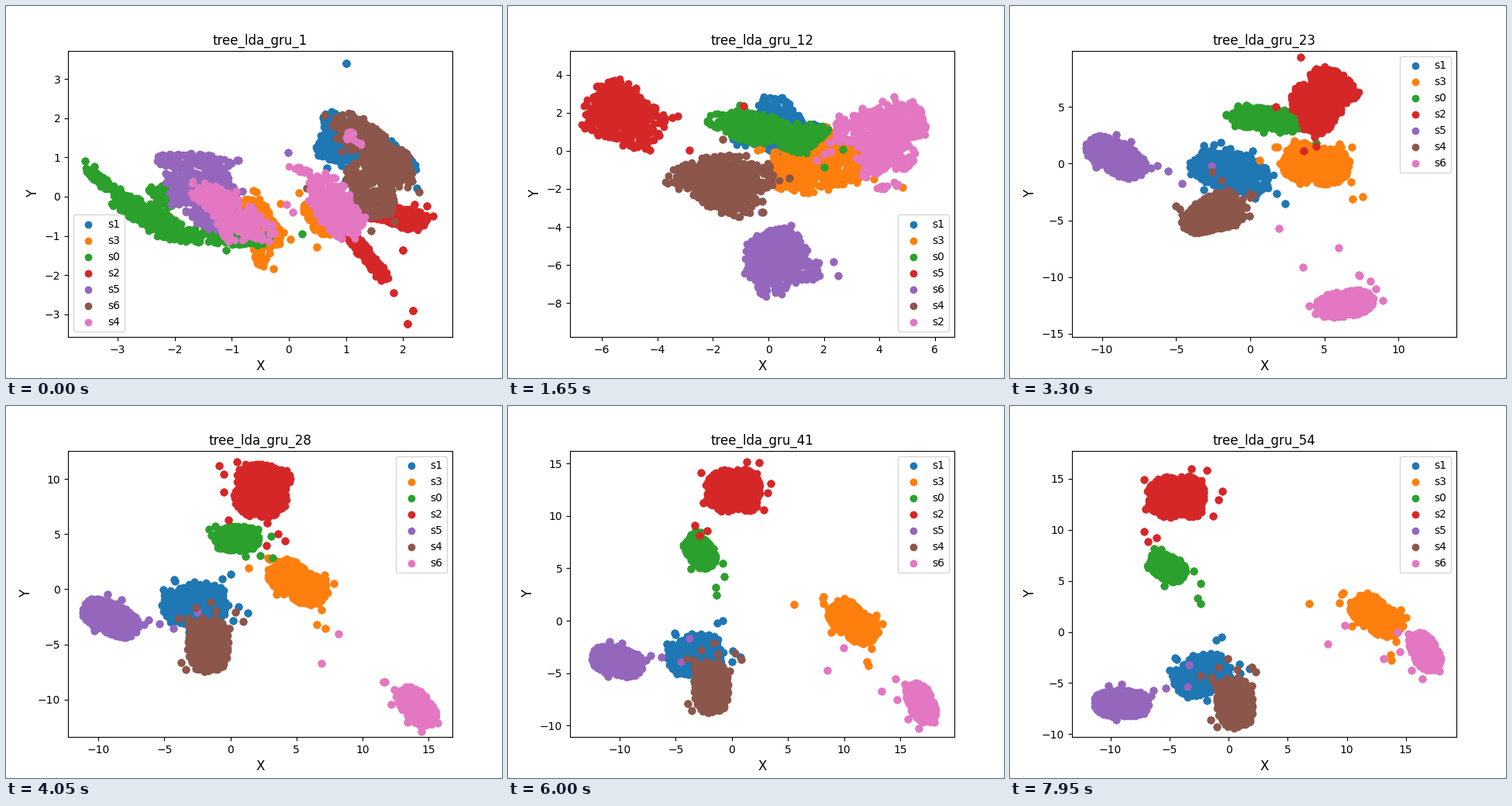
These frames come from a looping animation (640 by 480 pixels, 8000 ms). A matplotlib script:

```python
import numpy as np
import matplotlib.pyplot as plt
from matplotlib.animation import FuncAnimation

STEP_MS, TICK_MS, LOOP_MS = 150, 50, 8000
BODY, STRAY, COPIES, ROWS = 650, 12, 4, 6
MIRROR = np.array([-1, 1, 1, 1, -1])  # acts on x, y, half length, half width, tilt

# Half length and half width of each cluster once the clusters have separated.
SIZE = dict(s0=(1.6, 1.1), s1=(2.4, 1.7), s2=(2.4, 2.0), s3=(2.4, 1.4),
            s4=(2.3, 1.5), s5=(2.2, 1.3), s6=(1.9, 1.05))


def stroke(x0, y0, x1, y1, half_width):
    """A blob stretched between two points, as x, y, half length, half width, tilt."""
    tilt = np.arctan2(y1 - y0, x1 - x0)
    tilt = (tilt + np.pi / 2) % np.pi - np.pi / 2
    return (x0 + x1) / 2, (y0 + y1) / 2, np.hypot(x1 - x0, y1 - y0) / 2, half_width, tilt


def spot(x, y):
    return x, y, 0, 0, 0


def view(epoch, xlim, ylim, loc, order="1302546", mirrored=False, **blobs):
    """A key pose; `mirrored` means the x axis changes sign on the way to it."""
    return dict(epoch=epoch, xlim=np.array(xlim), ylim=np.array(ylim), loc=loc,
                order=["s" + digit for digit in order], mirrored=mirrored,
                blobs={name: np.resize(rows, (ROWS, 5)) for name, rows in blobs.items()})


def apart(epoch, xlim, ylim, mirrored=False, **places):
    """A pose with one blob of fixed size per cluster, placed by x, y and tilt."""
    blobs = {name: [(x, y, *SIZE[name], np.radians(tilt))]
             for name, (x, y, tilt) in places.items()}
    return view(epoch, xlim, ylim, "upper right", mirrored=mirrored, **blobs)


views = [
    view(1, (-3.872, 2.867), (-3.581, 3.723), "lower left", "1302564",
         s1=[stroke(.48, 1.3, 1.43, 1.2, .35), stroke(.7, 2.15, 1, 1, .2),
             stroke(1.45, 1.5, 2.2, .6, .2), spot(1, 3.4)],
         s3=[stroke(-.75, -.05, -.27, -1.25, .25), stroke(-.6, -1, -.48, -1.8, .08),
             stroke(.4, -.1, .75, -.95, .25)],
         s0=[stroke(-3.55, .7, -2.6, -.4, .1), stroke(-3.05, 0, -1.9, -.95, .25),
             stroke(-2.4, -.9, -.27, -1.1, .2), stroke(-2.4, .3, -2, -.2, .2)],
         s2=[stroke(1.2, -.2, 2.4, -.7, .25), stroke(1, -.85, 1.72, -2.15, .12),
             spot(2, -1.37), spot(2.18, -2.9), spot(2.08, -3.25)],
         s5=[stroke(-2.35, .95, -1, .85, .2), stroke(-2, .6, -1.1, -.75, .4),
             stroke(-1.35, .7, -1.05, -.8, .3)],
         s6=[stroke(.9, 2.1, 2.05, .3, .35), stroke(1.2, .9, 1.65, -.5, .35),
             stroke(1.5, 1.25, 2.1, .9, .2)],
         s4=[stroke(-1.65, .3, -.3, -1.05, .3), stroke(-1.3, .1, -.9, -1.2, .2),
             stroke(.5, .6, 1.05, -1.05, .35), stroke(.45, .1, 1.25, -.8, .3),
             stroke(0, .85, .45, .55, .08), stroke(1.05, 1.65, 1.22, 1.25, .1)]),
    view(7, (-3.339, 3.136), (-3.61, 3.498), "lower right", "1305642",
         s1=[stroke(1, 2.9, 1.15, 1.7, .25), stroke(.35, 1, 1.7, 1.9, .4),
             stroke(1.75, 1.2, 2.8, 1.15, .1)],
         s3=[stroke(-1.4, -1.4, 1.4, -1.35, .35), stroke(-1.25, -.4, 1.5, -.8, .6),
             stroke(.3, 1, .15, 0, .25)],
         s0=[stroke(-2.75, 0, -.9, -1.15, .35), stroke(-1.45, -1.2, -1, -1.6, .2),
             stroke(-1.2, -.6, 0, -.6, .15)],
         s5=[stroke(-2.8, .5, -1.05, .4, .65), stroke(-2.5, 1.8, -2.4, .8, .12),
             stroke(-2.18, 1.6, -2.12, .8, .06), stroke(-1.85, 1.9, -1.8, .9, .12),
             stroke(-2.25, -1.35, -1.45, -1.45, .25), spot(-3.04, -.82)],
         s6=[stroke(1.1, 2.8, 1.7, 2.75, .3), stroke(1.2, 1.4, 2.3, 1.5, .35),
             stroke(1.75, 1.5, 2.35, -.6, .4), stroke(1.3, -.8, 1.5, .8, .25)],
         s4=[stroke(-1.9, .3, -1, 1.6, .35), stroke(-1.1, .7, -.2, .85, .45),
             stroke(-.85, 0, -.8, -1.2, .35), stroke(-1.2, -.9, .25, -1.3, .3),
             stroke(.1, 0, 1.7, .55, .5), stroke(.75, 1.6, .8, -.55, .45)],
         s2=[stroke(-.2, -.6, 1.35, -.65, .25), stroke(1.05, -1.65, 1.25, -.5, .35),
             stroke(1.3, -.25, 2.4, .1, .45), stroke(.6, -.1, 1.5, 0, .15),
             spot(1.74, -3.28), spot(1.96, -3.17)]),
    view(18, (-10.99, 11.73), (-17.21, 7.38), "lower left", mirrored=True,
         s1=[stroke(-2, -2.6, 2, 2.4, 1.3), stroke(-.5, .2, 2, 1, 1.2)],
         s3=[stroke(-5.7, -.3, -1.7, -1, 1.9)],
         s0=[stroke(-4.7, 2.4, -.4, 4, .8), stroke(-1.5, 3.6, 1.5, 3.6, .7)],
         s2=[stroke(-9.5, 4, -5.6, 2.4, 1.7), stroke(-7.8, .5, -6.4, -1.1, .3)],
         s5=[stroke(7.6, 2.2, 10.6, 5.4, 1.2)],
         s4=[stroke(1.2, -3.9, 5.4, -3.1, 1.1), stroke(2.5, -6, 4.2, -3, .7)],
         s6=[stroke(1.2, -12.2, 1.6, -16, 1.1)]),
    apart(28, (-12.30, 16.82), (-13.41, 12.58), mirrored=True,
          s1=(-2.7, -1.4, 10), s3=(5.1, .6, -38), s0=(.5, 4.6, 0), s2=(2.4, 9, 80),
          s5=(-9.1, -2.6, -30), s4=(-1.7, -5, 90), s6=(14.1, -10.6, -55)),
    apart(36, (-13.88, 19.14), (-8.99, 15.49),
          s1=(-2.9, -3.1, 20), s3=(9.2, -1.5, -40), s0=(-2.4, 7.2, -60), s2=(.6, 12.3, 0),
          s5=(-10.2, -4.1, -28), s4=(-1.3, -5.4, 90), s6=(16.2, -5.7, -70)),
    apart(46, (-14.96, 20.54), (-13.2, 16.97),
          s1=(-3.7, -3.5, 15), s3=(12.4, 1.3, -40), s0=(-3.3, 5.9, -50), s2=(-.3, 12.5, 0),
          s5=(-10.3, -3.6, 0), s4=(-2.4, -7.2, 90), s6=(17.5, -9.9, -60)),
    apart(54, (-13.25, 19.28), (-10.30, 17.76),
          s1=(-2.3, -4.3, 30), s3=(12.5, 1.6, -40), s0=(-5.2, 6.3, -35), s2=(-4.4, 13.2, 0),
          s5=(-9.1, -7, 0), s4=(.5, -6.9, 95), s6=(16.6, -1.9, -65)),
]


def scatter_cloud(rows, seed):
    """Fill the blobs with markers; loose ones lie outside, drawn towards the origin."""
    rng = np.random.default_rng(seed)
    area = rows[:, 2] * rows[:, 3]
    share = np.cumsum(np.maximum(area, 0.02 * area.sum()))
    pick = np.append((np.arange(BODY) + 0.5) / BODY, rng.random(STRAY))
    x, y, length, width, tilt = rows[np.searchsorted(share / share[-1], pick)].T

    angle = rng.uniform(0, 2 * np.pi, BODY + STRAY)
    radius = np.sqrt(rng.random(BODY + STRAY)) * rng.normal(1, 0.05, BODY + STRAY)
    radius[BODY:] = 1.1 + rng.exponential(0.25, STRAY)
    pull = np.zeros(BODY + STRAY)
    pull[BODY:] = np.minimum(rng.exponential(0.1, STRAY), 0.5)

    def squarish(wave):
        return np.sign(wave) * np.abs(wave) ** 0.75

    along = length * radius * squarish(np.cos(angle))
    across = width * radius * squarish(np.sin(angle))
    points = np.column_stack([
        x * (1 - pull) + along * np.cos(tilt) - across * np.sin(tilt),
        y * (1 - pull) + along * np.sin(tilt) + across * np.cos(tilt)])
    return np.vstack([points[:BODY], np.repeat(points[BODY:], COPIES, axis=0)])


def pose(epoch):
    """Blend the two views around an epoch; a mirrored pair flips hard halfway."""
    last = max(i for i, v in enumerate(views[:-1]) if v["epoch"] <= epoch)
    a, b = views[last:last + 2]
    mix = (epoch - a["epoch"]) / (b["epoch"] - a["epoch"])
    turn = b["mirrored"]
    sign = MIRROR if turn else 1

    def blend(start, end):
        return (1 - mix) * start + mix * end

    xlim = blend(-a["xlim"][::-1] if turn else a["xlim"], b["xlim"])
    ylim = blend(a["ylim"], b["ylim"])
    blobs = {name: blend(a["blobs"][name] * sign, end) for name, end in b["blobs"].items()}
    if turn and mix < 0.5:
        xlim = -xlim[::-1]
        blobs = {name: rows * MIRROR for name, rows in blobs.items()}
    return xlim, ylim, blobs, a if mix < 0.5 else b


fig, ax = plt.subplots(figsize=(6.4, 4.8), dpi=100)
ax.set_xlabel("X", fontsize=12)
ax.set_ylabel("Y", fontsize=12)
layers = [ax.scatter([], [], color=f"C{i}") for i in range(7)]


def update(frame):
    epoch = frame * TICK_MS // STEP_MS + 1
    xlim, ylim, blobs, nearest = pose(epoch)
    for layer, name in zip(layers, nearest["order"]):
        layer.set_offsets(scatter_cloud(blobs[name], seed=int(name[1])))
        layer.set_label(name)
    ax.set_xlim(xlim)
    ax.set_ylim(ylim)
    ax.set_title(f"tree_lda_gru_{epoch}")
    ax.legend(loc=nearest["loc"])


anim = FuncAnimation(fig, update, frames=LOOP_MS // TICK_MS, interval=TICK_MS,
                     repeat=True, repeat_delay=0)
plt.show()
```
